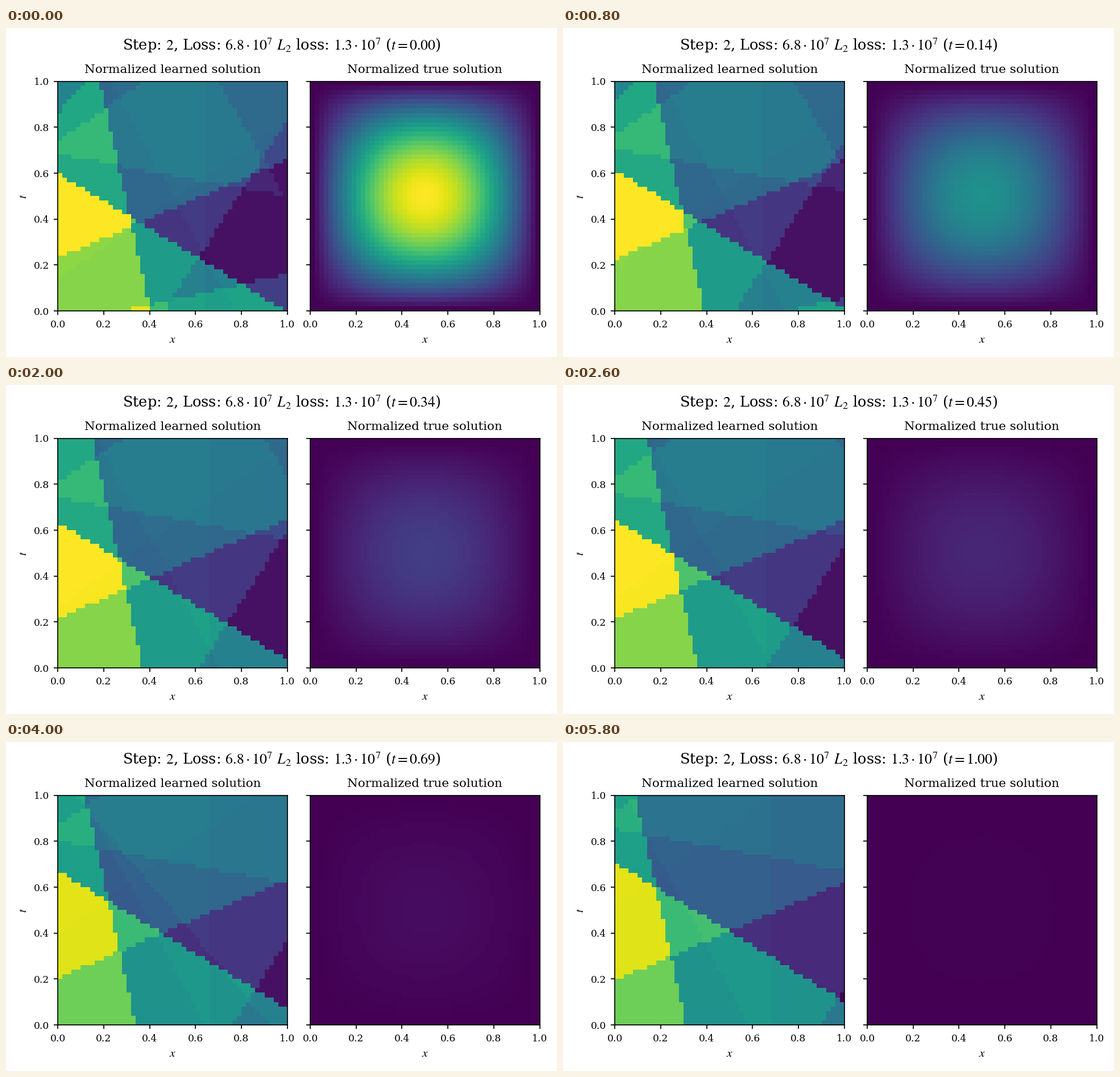
Animation, 969 px wide and 578 px high, one loop 6 s. Source, as a matplotlib script:

```python
import numpy as np
import matplotlib.pyplot as plt
from matplotlib.animation import FuncAnimation

W, H, DPI = 969, 578, 154
FRAMES, INTERVAL = 30, 200
SIDE, BOTTOM = 403.4, 497.1

plt.rcParams.update({
    "font.family": "DejaVu Serif",
    "mathtext.fontset": "stix",
    "font.size": 10,
    "axes.titlesize": 10,
    "axes.titlepad": 6.7,
    "axes.labelsize": 10,
    "xtick.labelsize": 8,
    "ytick.labelsize": 8,
    "xtick.major.pad": 3.8,
})

X, Y = np.meshgrid(np.linspace(0, 1, 50), np.linspace(0, 1, 50))


def learned(t):
    """Sum of steps, each across a straight edge that drifts with t."""
    v = np.ones_like(X)

    # Main wedge and the steep edge through it
    v -= 0.395 * (Y > 0.5935 + 0.11 * t - 0.602 * X)
    v -= 0.17 * (Y < 0.2275 - 0.038 * t + 0.431 * X)
    v -= 0.27 * (X > 0.4 - 0.095 * t - 0.223 * Y)

    # Upper edges
    v += 0.065 * (Y > 0.683 + 0.175 * t - 0.183 * X)
    v -= 0.07 * (Y > 0.752 + 0.19 * t + 0.68 * X)
    v -= 0.15 * (Y > 0.875 + 0.37 * t + 1.2 * X)
    v -= 0.06 * (X > 1.283 + 0.6 * t - 0.575 * Y)

    # Dark corner and the fast edges
    v -= 0.115 * (X > 0.47 + 0.44 * t + 0.645 * Y)
    v += 0.14 * (Y < 0.22 * X - 0.07 - 0.77 * t)
    v -= 0.04 * (Y < 5.4 * t - 2.64 - 1.17 * X)

    # Faint edges
    v += 0.022 * (X > 0.77 - 0.19 * t - 0.54 * Y)
    v -= 0.018 * (X > 0.64 + 0.045 * t)
    v -= 0.01 * (Y < 0.135 + 0.39 * t + 0.7 * X)
    return np.clip(v, 0, 1)


def true(t):
    return np.sin(np.pi * X) * np.sin(np.pi * Y) * np.exp(-np.pi**2 / 2 * t)


def heading(t):
    return (r"Step: $2$, Loss: $6.8 \cdot 10^7$ $L_2$ loss: "
            rf"$1.3 \cdot 10^7$ ($t={t:.2f}$)")


# The tiny margin keeps the pixel size from being truncated
fig = plt.figure(figsize=((W + 1e-6) / DPI, (H + 1e-6) / DPI), dpi=DPI,
                 facecolor="white")


def panel(left, title, field):
    ax = fig.add_axes([left / W, 1 - BOTTOM / H, SIDE / W, SIDE / H])
    img = ax.imshow(field(0), cmap="viridis", vmin=0, vmax=1, origin="lower",
                    extent=(0, 1, 0, 1), aspect="auto",
                    interpolation="nearest")
    ticks = np.linspace(0, 1, 6)
    ax.set(title=title, xlabel="$x$", xticks=ticks, yticks=ticks)
    return ax, img


ax_l, img_l = panel(91.2, "Normalized learned solution", learned)
ax_r, img_r = panel(535.1, "Normalized true solution", true)
ax_l.set_ylabel("$t$")
ax_r.tick_params(labelleft=False)
head = fig.text(485 / W, 1 - 39 / H, heading(0), fontsize=12,
                ha="center", va="baseline")


def update(i):
    t = i / (FRAMES - 1)
    img_l.set_data(learned(t))
    img_r.set_data(true(t))
    head.set_text(heading(t))
    return img_l, img_r, head


anim = FuncAnimation(fig, update, frames=FRAMES, interval=INTERVAL,
                     repeat=True, repeat_delay=0, blit=False)
plt.show()
```
